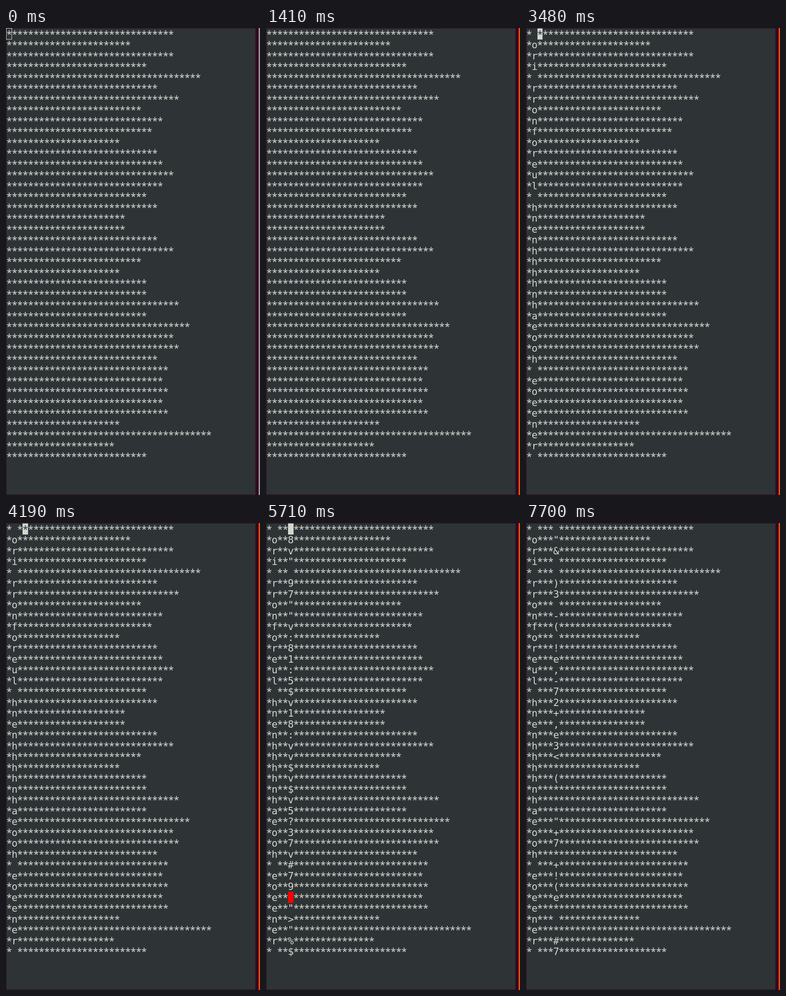
Recreate the animation shown at these times as an HTML page with a canvas. Size 553 by 1013 pixels, loop 8 s.

```html
<!DOCTYPE html>
<html lang="en">
<head>
<meta charset="utf-8">
<title>Masked terminal</title>
<style>
  html, body { margin: 0; width: 100%; height: 100%; overflow: hidden; background: #2e3436; }
  canvas { display: block; }
</style>
</head>
<body>
<canvas id="stage" width="553" height="1013"></canvas>
<script>
const ctx = document.getElementById('stage').getContext('2d');
const LOOP = 8000, BLINK = 560;
const CELL_W = 11.75, CELL_H = 23.5, EDGE = 1;
const BACK = '#2e3436', INK = '#d3d7cf', FRAME = '#300a24', ALERT = '#ff0000';

// Every character is masked by a star until its column is revealed.
const lines = `
* *   some line that goes quite
*o*(8"with text here ok
*r*,v&some line that goes quite
*i*)" more code runs under
* *   keep each word here with found
*r*19)then open next file as
*r*)73just move down past them x
*o*(" read what they mean
*n*a"-hold this line open now
*f* v(type here once more i
*o*1: find your place
*r*48!then open next file as
*e*/1ehold this line open now
*u*a:,some line that goes quite
*l*a5-hold this line open now
* *$$7more code runs under
*h*5v2then open next file as
*n*(1+side note goes a
*e*a8,side note goes a
*n*(:ethen open next file as
*h*5v3some line that goes quite
*h*/v<read what they mean
*h*a$*find your place
*h*2v(more code runs under
*n*a$*more code runs under
*h*2v*just move down past them x
*a*a5*more code runs under
*e*,?"five more keys must move far
*o*23+some line that goes quite
*o*%77just move down past them x
*h*2v*then open next file as
* *3#+turn back when done with
*e*)7!hold this line open now
*o*29(turn back when done with
*e*a\tehold this line open now
*e*a"*turn back when done with
*n*5> find your place
*e*a"*long rows hold more text than an
*r*/%#last line here
* *$$7more code runs under`.trim().split('\n');

// Each stroke moves the cursor, reveals its column, or masks it again.
const strokes = [
  { at: 680, col: 0 },
  { at: 2450, col: 1 },
  { at: 2920, col: 1, reveal: true, keep: true },
  { at: 3480, col: 2 },
  { at: 4130, col: 3 },
  { at: 4310, col: 3, reveal: true },
  { at: 5170, col: 3 },
  { at: 5540, col: 4 },
  { at: 5710, col: 4, reveal: true },
  { at: 6480, col: 4 },
  { at: 6940, col: 5 },
  { at: 7130, col: 5, reveal: true }
];

function rect(color, x, y, w, h) {
  ctx.fillStyle = color;
  ctx.fillRect(x, y, w, h);
}

function block(color, col, row) {
  const edge = (index, size) => Math.round(EDGE + index * size);
  const x = edge(col, CELL_W), y = edge(row, CELL_H);
  rect(color, x, y, edge(col + 1, CELL_W) - x, edge(row + 1, CELL_H) - y);
}

function glyph(char, col, row, color) {
  const star = char === '*';
  ctx.font = star ? '23px "Noto Sans Mono", monospace' : '21.5px "DejaVu Sans Mono", monospace';
  ctx.fillStyle = color;
  ctx.fillText(char, EDGE + (col + 0.5) * CELL_W, EDGE + row * CELL_H + (star ? 21.5 : 19.5));
}

function draw(time) {
  const past = strokes.filter(({ at }) => at <= time);
  const stroke = past.at(-1);
  const cursorOn = stroke && Math.floor((time - stroke.at) / BLINK) % 2 === 0;
  const isRevealed = col => past.some(s => s.col === col && s.reveal && (s.keep || s === stroke));

  rect(FRAME, 0, 0, 553, 1013);
  rect(BACK, 1, 1, 542, 1011);
  rect(stroke ? '#fa4b0a' : '#99948f', 550, 0, 3, 1013);
  if (cursorOn) block(INK, stroke.col, 0);

  ctx.textAlign = 'center';
  lines.forEach((line, row) => {
    for (let col = 0; col < line.length; col++) {
      const char = isRevealed(col) ? line[col] : '*';
      const underCursor = cursorOn && row === 0 && col === stroke.col;
      if (char === '\t') block(ALERT, col, row);
      else if (char !== ' ') glyph(char, col, row, underCursor ? BACK : INK);
    }
  });

  if (!stroke) {
    ctx.strokeStyle = INK;
    ctx.strokeRect(0.5, 0.5, 12, 24);
  }
}

function tick() {
  draw(performance.now() % LOOP);
  requestAnimationFrame(tick);
}
tick();
</script>
</body>
</html>
```
